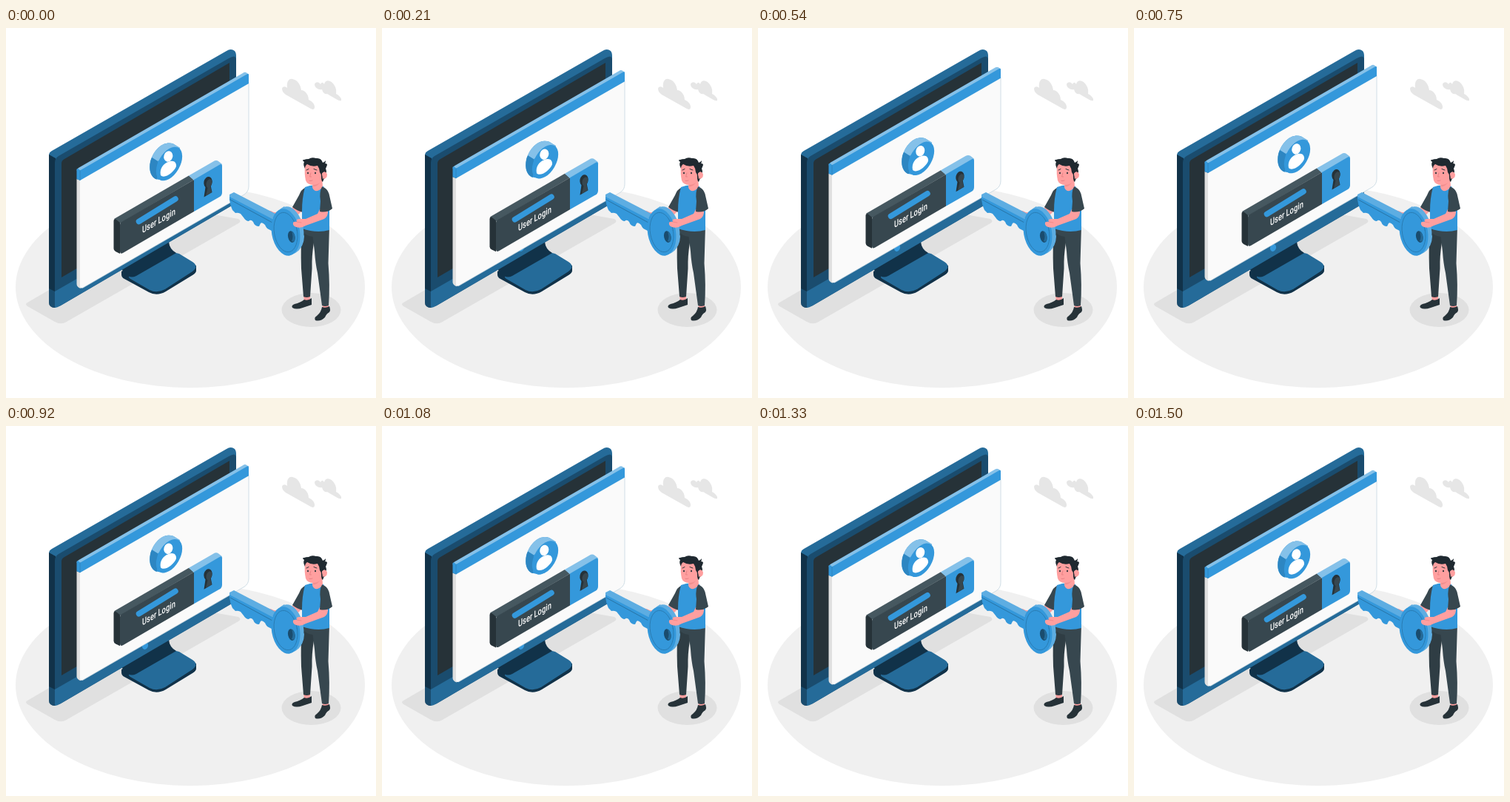
An HTML page that plays this animation: 500 px wide and 500 px high, repeating every 1540 ms.

```html
<!DOCTYPE html>
<html lang="en">
<head>
<meta charset="utf-8">
<title>User Login</title>
<style>
  html, body { margin: 0; width: 100%; height: 100%; overflow: hidden; background: #fff; }
  svg { display: block; width: 100%; height: 100%; }
  .blue { fill: #3498db; }
  .light { fill: #85c1e9; }
  .navy { fill: #1a4c6e; }
  .deep { fill: #113249; }
  .steel { fill: #256b99; }
  .slate { fill: #37474f; }
  .ink { fill: #263238; }
  .skin { fill: #ff9f9f; }
  .grey { fill: #e0e0e0; }
  .line { fill: none; stroke-linecap: round; stroke-linejoin: round; }
  text { font: 500 13px Roboto, "Open Sans", sans-serif; fill: #fff; }
</style>
</head>
<body>
<svg viewBox="0 0 500 500">
  <!-- floor and shadows -->
  <ellipse cx="249" cy="350" rx="236" ry="136.200" fill="#f0f0f0"/>
  <path class="grey" d="M29 371L240 248Q246 245 252 247L314 258Q319 261 314 264L80 398Q73 401 66 397L29 376Q25 373 29 371Z"/>
  <ellipse class="grey" cx="412.500" cy="381" rx="40" ry="23"/>

  <!-- clouds -->
  <g fill="#e6e6e6">
    <path d="M373 82C374 78 378 79 380 81C379 73 382 68 387 69C394 70 398 77 399 84C404 84 409 90 409 97C414 99 418 104 417 108C416 111 413 110 410 108L378 90C375 88 373 85 373 82Z"/>
    <path d="M417 76C418 73 422 72 425 76C427 72 429 74 430 76C431 70 437 70 441 74C445 78 447 83 446 89C450 91 454 95 453 98C451 99 448 97 446 96L434 89C431 90 428 87 427 83C423 84 417 81 417 76Z"/>
  </g>

  <!-- stand -->
  <path class="deep" d="M156 329L200 305L257 321V328Q257 331 252 334L216 356Q204 363 193 357L160 339Q156 337 156 333Z"/>
  <path class="steel" d="M170 332L222 302L234 305L252 316Q261 322 252 329L215 353Q204 359 194 354L168 339Q163 336 170 332Z"/>
  <path class="deep" d="M157 326L220 289Q221 299 230 304L176 335Q170 338 165 335Q157 331 157 326Z"/>

  <!-- monitor -->
  <path class="steel" d="M58 176V172Q58 168 62 166L298 31Q304 27 309 31Q311 33 311 38V50L68 190Z"/>
  <path class="deep" d="M58 171L67 176V378Q58 378 58 370Z"/>
  <path class="navy" d="M66 182Q66 176 71 173L301 41Q311 35 311 43V229Q311 236 305 240L74 375Q66 379 66 371Z"/>
  <path class="steel" d="M66 356L311 215V229Q311 236 305 240L74 375Q69 378 66 378Z"/>
  <path class="navy" d="M58 352L66 356V378Q58 378 58 370Z"/>
  <path class="ink" d="M75 183Q75 179 79 177L302 47V205L75 337Z"/>
  <ellipse class="blue" cx="188" cy="297" rx="4" ry="5" transform="rotate(20 188 297)"/>

  <!-- floating window -->
  <g id="win">
    <path class="grey" d="M95.500 204L101 206V352Q95.500 350 95.500 346Z"/>
    <path d="M100 205L328 74V214Q328 221 322 225L104 351Q100 353 100 348Z" fill="#fafafa"/>
    <path class="line" d="M328 75V214Q328 221 322 225L104 351" stroke="#c4d6e0" stroke-width=".8"/>
    <path class="light" d="M95.500 192.500Q95.500 190.500 98 189L320 61Q323 59 325 60.500L328 62.500L100 194Z"/>
    <path class="blue" d="M95.500 191Q96 189.500 98 190.500L100 192.500L325 62.700Q328 61 328 63.500V75L100 206L95.500 204Z"/>
    <path class="line" d="M100 192.500V205.500" stroke="#2b80b9" stroke-width=".8"/>

    <!-- badge -->
    <path class="blue" d="M194.300 188.700C194 176 202 162 213 157C218 155 222 155 226 156.500L235 162L212 206L202 204C197 201 194.300 196 194.300 188.700Z"/>
    <path class="light" d="M197 175C200 167 206 160 213 157C218 155 222 155 226 156.500L235 162L205 180Z"/>
    <path d="M194.300 188C194.300 183 195 179 197 175L205 180L204 204.500L202 204C197 201 194.300 195 194.300 188Z" fill="#2d86c2"/>
    <circle class="blue" r="20.400" transform="matrix(.866 -.5 0 1 220.500 183.500)"/>
    <g fill="#fff">
      <ellipse cx="219.300" cy="173.500" rx="5.900" ry="7.300" transform="rotate(18 219.300 173.500)"/>
      <path d="M209 199C207 190 213 183 219 181C226 178 230.500 181 230 187C227 195 214 204.500 209 199Z"/>
    </g>

    <!-- login bar -->
    <path d="M146 258L247 199.500L254 205L154 264Z" fill="#465860"/>
    <path class="ink" d="M145.500 261Q145.500 257 149 259L154 263V305L148 302Q145.500 300.500 145.500 298Z"/>
    <path class="slate" d="M154 266Q154 263 157 261.500L254 205V248L158 304Q154 306 154 302Z"/>
    <path class="light" d="M247 199.500L280 180.500Q284 178 287 180L292 184L254 206Z"/>
    <path class="blue" d="M254 205L289 184.500Q292 183 292 186V222Q292 226 289 228L254 248Z"/>
    <path class="line" d="M179.500 261.500L229 231" stroke="#3498db" stroke-width="7.500"/>
    <text transform="matrix(.72 -.415 0 1 184 277.500)">User Login</text>
    <g class="ink">
      <ellipse cx="273" cy="208.500" rx="5.600" ry="7.600" transform="rotate(12 273 208.500)"/>
      <path d="M270 212L267.500 228.500L278.500 222L276 210Z"/>
    </g>
    <path class="slate" d="M270.500 211C271 206 275 203 277.500 205C279 208 278 212 276 214L278 222L270 226.500L272.500 216Q270.500 215 270.500 211Z"/>
  </g>

  <!-- far arm -->
  <path class="skin" d="M390 240L401 246L390 257L374 262L356 254Q350 252 352 248Q355 245 362 249L380 250Z"/>
  <path class="slate" d="M404 216Q399 218 396 226L387 242Q393 247 401 249L407 232Z"/>

  <!-- legs -->
  <path class="skin" d="M402 360H411V370H403ZM427.500 373H436V382H428Z"/>
  <path class="ink" d="M403 367Q408 369 413 365L413 374Q407 376 401 378Q392 381 387 378Q385 375 390 373Q398 371 403 367Z"/>
  <path class="ink" d="M427 377Q432 379 437 376Q439 381 437 384Q433 386 431 391Q425 397 418 395Q416 391 420 389Q426 384 427 377Z"/>
  <path fill="#2f3d44" d="M400 268H422L416 290Q413 308 413.500 325L411 363Q406 365 402 363L399 325Q398 295 400 268Z"/>
  <path class="slate" d="M403 268H437L435.500 318Q438 348 436 375Q431 377 427 375L421 331Q418 318 417 302L414.500 282Q405 281 402 275Z"/>

  <!-- torso and head -->
  <path class="blue" d="M404 215Q416 210 429 214L437 235V273Q420 278 400 271V247Q400 230 404 215Z"/>
  <path class="skin" d="M415 204L427 202L428 214Q424 221 418 220Q414 218 414 214Z"/>
  <path fill="#f28f8f" d="M415 211Q421 211 425 205L424 209Q420 215 415 214Z"/>
  <path class="skin" d="M404 186Q409 181 418 183L428 187V196Q433 193 434 198Q434 204 428 204Q425 211 416 212Q407 212 405 206Q403 197 404 186Z"/>
  <path fill="#1f2930" d="M404 190Q401 184 403 181Q399 178 403 178Q405 177 409 177Q413 174 419 176Q426 175 428 182Q431 181 432 179Q432 182 431 183Q434 183 434 185Q433 188 432 190Q434 195 432 196Q429 193 427 197Q428 202 430 203L428 208Q426 207 426 201Q426 197 424 195Q424 190 421 186Q413 188 407 184Q404 186 404 190Z"/>
  <path class="skin" d="M427 197Q430 192 433 196Q434 202 428 204Z"/>
  <g class="ink">
    <ellipse cx="408" cy="196" rx="1" ry="1.300"/>
    <ellipse cx="418" cy="196" rx="1" ry="1.300"/>
  </g>
  <path class="line" d="M406 192L409 190.500M416 190.500L420 192" stroke="#263238" stroke-width="1"/>
  <path class="line" d="M412 196L410.500 201H412.500M410 206.500Q412 207 414 206" stroke="#e27c7f" stroke-width=".8"/>

  <!-- key -->
  <path class="blue" d="M302 226L361 258V275L355 272Q352 271 350 266Q346 262 344 264L342 268Q336 268 334 262Q331 258 328 261Q324 261 321 256L317 251Q313 249 310 250L306 246Q303 240 302 232Z"/>
  <path d="M302 225L308 222L366 252L360 258L302 228Z" fill="#5dade2"/>
  <path class="line" d="M303 232L360 263" stroke="#256b99" stroke-width=".8"/>
  <g fill="#5dade2">
    <ellipse cx="383" cy="273" rx="19" ry="32" transform="rotate(-10 383 273)"/>
    <path d="M370 245L376 241L403 281Q403 296 391 304L384 307Z"/>
  </g>
  <g transform="rotate(-10 378 276)">
    <ellipse class="blue" cx="378" cy="276" rx="19" ry="32"/>
    <ellipse class="line" cx="378" cy="276" rx="15.500" ry="27" stroke="#2878ad" stroke-width=".8"/>
  </g>
  <ellipse class="navy" cx="385.800" cy="282" rx="4.700" ry="8" transform="rotate(-12 386 282)"/>
  <path class="steel" d="M386 275Q391 278 390.500 286Q389 290 386 288Q389 282 386 275Z"/>

  <!-- near arm -->
  <path class="skin" d="M424 245L435 248Q435 255 430 258L405 267Q399 271 392 269Q387 267 388 263Q389 261 393 262Q391 258 397 258L405 258L421 251Z"/>
  <path class="line" d="M393 262L399 263" stroke="#ee8585" stroke-width=".8"/>
  <path class="slate" d="M427 214.500Q434 216 436.500 224L441 244Q434 250 424 248L425 234Q423 222 427 214.500Z"/>
</svg>
<script>
  const LOOP = 1540, FPS = 24, HALF = 18, LIFT = 10;
  const win = document.getElementById("win");

  // Linear rise and fall in 24 fps steps
  function draw(ms) {
    const step = Math.floor((ms % LOOP + 5) * FPS / 1000);
    const up = Math.max(0, 1 - Math.abs(step - HALF) / HALF);
    win.setAttribute("transform", `translate(0 ${-LIFT * up})`);
  }

  function tick(now) {
    draw(now);
    requestAnimationFrame(tick);
  }
  draw(0);
  requestAnimationFrame(tick);
</script>
</body>
</html>
```
